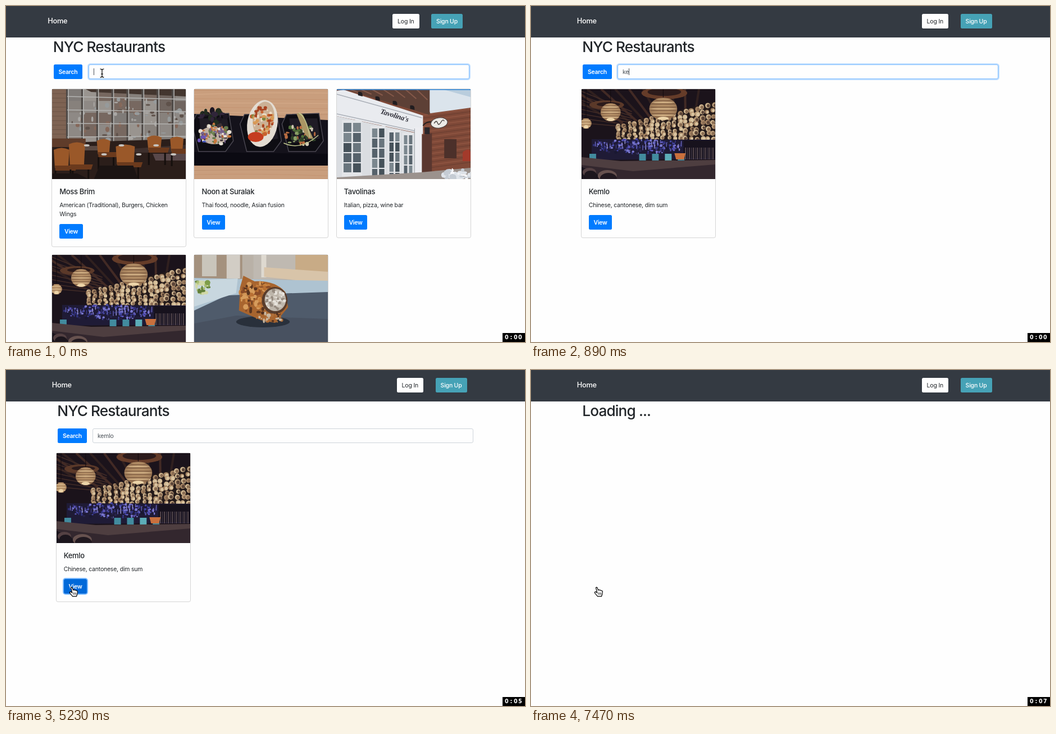
Write an HTML page that moves like this. It is 924 px wide and 598 px high and loops after 8 s.

```html
<!DOCTYPE html>
<html lang="en">
<head>
<meta charset="utf-8">
<title>Restaurant search</title>
<style>
  html, body { margin: 0; width: 100%; height: 100%; overflow: hidden; background: #fefefe; }
  svg { display: block; }
  text { font: 400 10.5px Inter, sans-serif; letter-spacing: -.02em; fill: #212529; }
  .label { font-weight: 500; fill: #fff; }
  .strong { font-weight: 600; letter-spacing: -.03em; }
  .home { font-size: 12.8px; font-weight: 500; fill: #fff; }
  .heading { font-size: 26.2px; font-weight: 500; letter-spacing: -.033em; }
  .title { font-size: 13px; font-weight: 500; letter-spacing: -.025em; }
  .typed { fill: #495057; }
  .clock { font: 700 9.6px "DejaVu Sans", sans-serif; letter-spacing: 0; fill: #fff; }
  .sign { font: italic 700 13px "Liberation Serif", serif; fill: #2b2b35; }
</style>
</head>
<body>
<svg id="stage" width="924" height="598" viewBox="0 0 924 598">
  <defs id="pictures"></defs>
  <g id="scene"></g>
</svg>
<script>
const LOOP = 8000;
const SCROLLBAR_SHIFT = -7.5;

const rect = (x, y, w, h, fill, extra = '') =>
  `<rect x="${x}" y="${y}" width="${w}" height="${h}" fill="${fill}" ${extra}/>`;
const oval = (x, y, rx, ry, fill, extra = '') =>
  `<ellipse cx="${x}" cy="${y}" rx="${rx}" ry="${ry}" fill="${fill}" ${extra}/>`;
const path = (d, fill, extra = '') => `<path d="${d}" fill="${fill}" ${extra}/>`;
const line = (d, color, width = 1) => path(d, 'none', `stroke="${color}" stroke-width="${width}"`);
const text = (x, y, value, cls = '', extra = '') =>
  `<text x="${x}" y="${y}" class="${cls}" ${extra}>${value}</text>`;
const times = (n, draw) => Array.from({ length: n }, (_, i) => draw(i)).join('');

let seed = 7;
const rnd = (a = 0, b = 1) => {
  seed = (seed * 16807) % 2147483647;
  return a + (b - a) * seed / 2147483647;
};
const pick = list => list[Math.floor(rnd(0, list.length))];
const specks = (n, x, y, rx, ry, colors, size = 4) => times(n, () => {
  const a = rnd(0, 6.3), r = Math.sqrt(rnd());
  return oval(x + rx * r * Math.cos(a), y + ry * r * Math.sin(a), rnd(1, size), rnd(1, size), pick(colors));
});

// Each picture is drawn in a 239 x 160 box.
function diner() {
  const chair = (x, y, w, h) =>
    path(`M${x} ${y + 4}q${w / 2} -7 ${w} 0l-2 ${h}h${4 - w}z`, '#9a5829') +
    path(`M${x + 2} ${y + h}h${w + 12}l-3 9h${-w - 8}z`, '#6b3a1d') +
    line(`M${x + 3} ${y + h + 9}v22M${x + w + 6} ${y + h + 9}v22`, '#150f0d', 3);
  return rect(0, 0, 239, 160, '#7f7772') +
    times(8, i => times(5, j => rect(24 + i * 28, j * 21, 28, 21,
      pick(['#7f7b78', '#8e8985', '#70655f', '#99948f', '#776860', '#87817c'])))) +
    specks(70, 140, 55, 105, 38, ['#a9a7a4', '#5f524b', '#85685a', '#969a9b'], 5) +
    path('M60 0H239V13L70 5z', '#43362f') +
    rect(0, 0, 27, 98, '#7e6353') +
    times(13, i => line(`M0 ${i * 8}h27`, '#6c5446')) +
    times(9, i => line(`M${27 + i * 27} 0V98`, '#4f4a47', 4) + line(`M${29 + i * 27} 0V98`, '#b9bab8', 1.5)) +
    times(4, j => line(`M27 ${13 + j * 24}L239 ${18 + j * 22}`, '#b4b4b2', 1.5)) +
    path('M0 96L239 88V160H0z', '#2b1e1a') +
    path('M0 88H60V103H0z', '#5f3c2a') +
    path('M130 107l109 -8v14H150z', '#3d2f2c') +
    path('M180 115h59v12h-54z', '#59484a') +
    path('M32 101h52v8H32z', '#5b4a43') +
    chair(3, 104, 28, 32) + chair(30, 94, 29, 40) + chair(80, 88, 24, 24) +
    chair(114, 98, 34, 32) + chair(170, 82, 26, 22) + chair(211, 84, 24, 22) +
    times(6, i => oval(62 + i * 31, 100 + (i % 2) * 16, 5, 2, '#c6c3bf')) +
    path('M0 150h45l20 10H0zM85 136h60l9 24H75z', '#1b1413');
}

function bowls() {
  const rim = x => `M${x + 8} 45L${x + 66} 43L${x + 74} 92L${x + 60} 111H${x + 12}L${x} 62z`;
  const bowl = x => path(rim(x), '#0e0d13') + line(rim(x), '#494650', 1.5) +
    path(`M${x + 13} 52h50l5 36l-50 8z`, '#1f1c25');
  return rect(0, 0, 239, 160, '#c99e7d') +
    times(22, i => line(`M0 ${i * 7.5 + 2}q120 ${rnd(-5, 5)} 239 ${rnd(-3, 3)}`, pick(['#bd9070', '#d5ac8b', '#c49472']))) +
    path('M0 44L239 55V136H0z', '#14121b') +
    path('M0 112l239 3v21H0z', '#0b0a12') +
    bowl(-4) + bowl(82) + bowl(157) +
    specks(30, 34, 50, 24, 12, ['#1c1622', '#302539', '#222d20'], 7) +
    oval(36, 82, 26, 16, '#bfb0a2') +
    specks(75, 37, 80, 29, 19, ['#e6ded2', '#a65a3c', '#c9773c', '#667c4c', '#75608a', '#3b3034'], 4) +
    specks(5, 15, 89, 7, 5, ['#4557c4', '#6b54b8']) +
    oval(122, 61, 27, 42, '#e3dcd2', 'transform="rotate(10 122 61)"') +
    oval(124, 53, 19, 31, '#cbb196', 'transform="rotate(10 124 53)"') +
    specks(70, 122, 56, 20, 27, ['#c8622f', '#d89a57', '#ecdcc5', '#7a843f', '#a84321'], 4) +
    oval(110, 85, 14, 9, '#c53d1f') +
    specks(65, 190, 82, 28, 19, ['#4f6e38', '#8ba067', '#d2c8b4', '#b96c41', '#2f4228'], 4) +
    path('M183 44q12 -6 16 14l14 30q-9 2 -16 -10z', '#a99564') +
    line('M187 42q14 8 20 44M160 96q30 14 62 -14', '#c1c78f', 1.5);
}

function storefront() {
  const door = (x, y, w) => rect(x, y, w, 160 - y, '#e3e5e8') +
    times(2, i => times(5, j => rect(x + 3 + i * (w / 2 - 1), y + 5 + j * 18, w / 2 - 4, 16,
      pick(['#56626b', '#69757d', '#46525a', '#7b878e']))));
  return rect(0, 0, 239, 160, '#7f4938') +
    path('M150 0H239V33L167 43z', '#dbe4ec') +
    path('M188 0H239V14z', '#b9cddd') +
    times(20, j => line(`M150 ${47 + j * 5}L239 ${35 + j * 5}`, j % 2 ? '#6e4032' : '#915642', 1.5)) +
    path('M0 0H166V46L20 2z', '#5d4036') +
    times(7, i => line(`M${22 + i * 20} 0l20 ${7 + i * 2}`, '#85594a', 2)) +
    path('M152 82L170 78V160H150z', '#5a372f') +
    path('M0 3L12 1L154 47V80L0 48z', '#e9ebef') +
    line('M0 44L152 77M0 9L152 51', '#a9aeb6', 1.5) +
    path('M0 48L150 80V160H0z', '#dadde1') +
    door(9, 55, 36) + door(60, 65, 27) + door(91, 72, 23) + door(117, 77, 20) +
    rect(139, 68, 13, 92, '#ecedf1') + line('M139 70V158', '#9fa5ab') +
    text(77, 43, 'Tavolina\'s', 'sign', 'transform="rotate(17 77 43)"') +
    times(4, i => path(`M${38 + i * 31} ${5 + i * 8}q9 -2 8 8l-8 -2z`, '#211d20')) +
    line('M154 65q8 -10 20 -5', '#24201f', 2) +
    rect(157, 68, 9, 12, '#29262a') +
    oval(183, 60, 15, 9, '#eceae6', 'stroke="#494342" transform="rotate(-8 183 60)"') +
    line('M174 61q4 -7 6 -1t6 -1t6 -2', '#3d3836', 1.3) +
    path('M192 89h22v34h-22z', '#4c302a') +
    path('M225 112q12 -9 14 0v16h-14z', '#a33a2b') +
    path('M0 157L150 148L239 140V160H0z', '#9b928d') +
    specks(40, 216, 151, 27, 8, ['#f6f7fa', '#dfe4ea', '#c5ccd4'], 6) +
    rect(0, 0, 239, 1.5, '#2f86d8');
}

function bar() {
  const lantern = (x, y, rx, ry) => oval(x, y, rx, ry, '#8f6c4d') +
    times(7, i => {
      const k = (i - 3) / 3.5;
      return oval(x, y + k * ry, rx * Math.sqrt(1 - k * k), 1.5, i % 2 ? '#cfae83' : '#b48f67');
    }) +
    line(`M${x} 0V${y - ry}`, '#140d10') +
    oval(x, y + ry - 3, rx * .4, 3, '#ecd4a8');
  return rect(0, 0, 239, 160, '#1b131b') +
    times(11, i => line(`M${i * 25 - 40} 0L${60 + i * 14} 60`, i % 2 ? '#422a25' : '#30201f', 4)) +
    times(8, i => line(`M0 ${i * 8 + 4}L90 ${40 + i * 4}`, '#432c27', 1.5)) +
    path('M62 65L239 22V90H62z', '#241a1a') +
    times(18, i => times(7, j => {
      const x = 66 + i * 10, top = 66 - i * 2.2, r = rnd(2.6, 4.2) + i * .07;
      const cx = x + rnd(-2, 2), cy = top + j * (88 - top) / 6 + rnd(-2, 2);
      return oval(cx, cy, r, r, pick(['#b99b78', '#cdb48f', '#a58463'])) +
        oval(cx + 1, cy + .5, r * .6, r * .65, pick(['#8b6d53', '#5c4538', '#d9c4a0']));
    })) +
    oval(45, 28, 31, 8, '#5b3929') + oval(48, 27, 21, 4, '#2a1a1b') +
    oval(148, 7, 41, 11, '#653c29') + oval(148, 5, 30, 7, '#2c1b1b') +
    lantern(146, 35, 25, 20) + lantern(52, 41, 18, 16) + lantern(8, 61, 10, 9) +
    path('M18 89L239 90V124L18 126z', '#1f1b36') +
    specks(230, 102, 102, 82, 13, ['#4547a6', '#5f58bd', '#31327c', '#7a78cf', '#27234c', '#191832'], 2.6) +
    times(30, i => rect(24 + i * 5.3, rnd(90, 101), 1.3, rnd(5, 11), pick(['#6c69c4', '#3b3a90', '#a29dd6']))) +
    rect(182, 91, 57, 32, '#17121d') +
    times(5, i => rect(i ? 80 + i * 23 : 14, 115, 12, 12, pick(['#5cadb8', '#428b9e', '#7dbfc5']))) +
    times(15, i => line(`M${186 + i * 3.5} 104v21`, i % 2 ? '#3d3442' : '#65565a', 1.5)) +
    path('M0 121L70 128L239 126V136L92 148L0 137z', '#4e3e40') +
    path('M0 135L92 146L239 134V160H0z', '#33272e') +
    path('M0 138L45 160H0z', '#19141c') +
    path('M166 114h20l-3 11h-14z', '#c9703d') +
    oval(46, 154, 17, 10, '#67524f') + oval(48, 159, 15, 10, '#211920') +
    oval(14, 148, 12, 8, '#544143') + oval(16, 153, 11, 8, '#1c161d');
}

function roll() {
  return rect(0, 0, 239, 160, '#b9b1a7') +
    rect(0, 0, 86, 45, '#a4917e') + rect(14, 0, 26, 38, '#c9c5bb') + rect(58, 0, 24, 42, '#d2cdc5') +
    rect(106, 0, 75, 43, '#bfb9b1') + rect(120, 0, 9, 40, '#ded9d0') + rect(181, 0, 58, 38, '#c8ab86') +
    path('M125 22L239 30V51L125 39z', '#d8c4a9') +
    path('M0 41L239 46V160H0z', '#aec3d1') +
    path('M0 99L58 72L239 66V160H0z', '#4f5b6b') +
    path('M0 122L75 108L239 114V160H0z', '#485160') +
    path('M0 45L78 42L75 68L0 92z', '#c8d7df') +
    specks(34, 14, 57, 15, 12, ['#7e9d49', '#a8bd70', '#d1d8a7', '#617f3a'], 5) +
    oval(123, 119, 48, 10, '#29303b') +
    path('M82 58L88 37L108 47Q144 45 163 66L168 93L145 121L119 116L80 99z', '#a8652f') +
    specks(110, 112, 75, 32, 28, ['#c98340', '#8a4c28', '#d69c5c', '#5c361f', '#b87034'], 5) +
    oval(144, 81, 23, 24, '#593d2c') + oval(145, 80, 19, 20, '#bdb5aa') +
    specks(60, 145, 80, 17, 18, ['#e6e2db', '#cfc8be', '#958a7f'], 3.5) +
    specks(35, 135, 111, 26, 10, ['#52301f', '#b06e38', '#c9b7a0'], 4);
}

const pictures = { diner, bowls, storefront, bar, roll };
document.getElementById('pictures').innerHTML = Object.entries(pictures).map(([id, draw]) =>
  `<symbol id="${id}" viewBox="0 0 239 160" preserveAspectRatio="none">${draw()}</symbol>`).join('');

const restaurants = [
  { name: 'Moss Brim', picture: 'diner', about: ['American (Traditional), Burgers, Chicken', 'Wings'] },
  { name: 'Noon at Suralak', picture: 'bowls', about: ['Thai food, noodle, Asian fusion'] },
  { name: 'Tavolinas', picture: 'storefront', about: ['Italian, pizza, wine bar'] },
  { name: 'Kemlo', picture: 'bar', about: ['Chinese, cantonese, dim sum'] },
  { name: '', picture: 'roll', about: [''] }
];

// Timelines: [start, value...]; the latest entry that has started is in force.
const typing = [[0, ''], [750, 'k'], [890, 'ke'], [990, 'kem'], [1290, 'kemlo']];
const caretOn = [[0, 1], [450, 0], [750, 1], [1890, 0], [2440, 1], [2890, 0]];
const clock = [[0, 0], [990, 1], [2040, 2], [3190, 3], [4180, 4], [5230, 5], [6270, 6], [7170, 7]];
const pointer = [[0, 'beam', 171, 119], [890, ''], [1890, 'arrow', 119, 225], [2040, 'arrow', 108, 262],
  [2140, 'arrow', 93, 305], [2290, 'arrow', 102, 344], [2440, 'arrow', 105, 368],
  [2590, 'hand', 117, 385.5], [2740, 'hand', 117, 386.5]];
const viewStyle = [[0, '#007bff', 0], [2590, '#0072ec', 0], [2740, '#0069d9', 0],
  [3040, '#0062cc', .3], [3190, '#0066d2', .45], [3290, '#0069d9', .5]];
const inputStyle = [[0, '#80bdff', .25], [3040, '#b5c9dc', 0], [3190, '#ced4da', 0]];
const at = (list, t) => list.filter(entry => entry[0] <= t).pop().slice(1);

const beam = 'M-3.5 -7q3 0 3.5 2q.5 -2 3.5 -2M0 -5V6M-3.5 8q3 0 3.5 -2q.5 2 3.5 2M-2 2h4';
const cursors = {
  beam: line(beam, '#fff', 2.6) + line(beam, '#000', 1.2),
  arrow: path('M0 0V14.5L3.3 11.4L5.7 17L8.4 15.9L6 10.4H10.5z', '#000', 'stroke="#fff" stroke-width="1.2"'),
  hand: path('M-1.5 .8Q-.3 -.7 1 .8L2.6 5.2Q4.6 3.8 5.4 5.6Q7.2 4.6 8 6.4Q10.2 5.8 10.4 8L9.8 12.5L8.5 16.3H1.6L-3.5 10.3Q-4 8.2 -2 8.2L.7 9.8z',
    '#fff', 'stroke="#000" stroke-width="1.2"') + line('M3 9.5v4M5.2 9.5v4M7.4 9.5v4', '#000', .8)
};

// Both edges snap to whole pixels, as a browser lays out boxes.
function button(x, y, w, label, fill, cls = 'label', ring = 0) {
  const left = Math.round(x), width = Math.round(x + w) - left;
  return (ring ? rect(left - 1, y - 1, width + 2, 28, 'none', `rx="4" stroke="#007bff" stroke-opacity="${ring}" stroke-width="2"`) : '') +
    rect(left, y, width, 26, fill, 'rx="2.5"') +
    text(x + 8.7, y + 17, label, cls);
}

function navbar(dx) {
  return rect(0, 0, 924, 56, '#343a42') + text(81.7 + dx, 31, 'Home', 'home') +
    button(695.9 + dx, 14, 47.3, 'Log In', '#fefefe', '') +
    button(764.9 + dx, 14, 55.9, 'Sign Up', '#46a2b6');
}

function card(item, index, dx, t) {
  const x = 88.7 + 253.2 * (index % 3) + dx, left = Math.round(x);
  const y = index < 3 ? 148 : 443;
  const extra = 16 * (item.about.length - 1);
  const [fill, ring] = at(viewStyle, t);
  return `<use href="#${item.picture}" x="${left + 1}" y="${y}" width="238" height="160"/>` +
    rect(left + .5, y - .5, 239, 265 + extra, 'none', 'rx="3" stroke="#000" stroke-opacity=".16"') +
    text(x + 14, y + 187, item.name, 'title') +
    item.about.map((row, i) => text(x + 14, y + 210 + 16 * i, row)).join('') +
    button(x + 14.2, y + 224 + extra, 41.5, 'View', fill, 'label strong', ring);
}

function searchPage(t) {
  const dx = t < 750 ? SCROLLBAR_SHIFT : 0;
  const [query] = at(typing, t), [border, ring] = at(inputStyle, t);
  const left = Math.round(154 + dx);
  const found = restaurants.filter(r => r.name.toLowerCase().includes(query));
  return navbar(dx) + text(91.3 + dx, 82, 'NYC Restaurants', 'heading') +
    button(92.4 + dx, 104, 51.4, 'Search', '#007bff', 'label strong') +
    (ring ? rect(left - .5, 103.5, 679, 27, 'none', `rx="4" stroke="#007bff" stroke-opacity="${ring}" stroke-width="3"`) : '') +
    rect(left + .5, 104.5, 677, 25, '#fefefe', `rx="2.5" stroke="${border}"`) +
    text(163 + dx, 121, query, 'typed', 'id="query"') +
    (at(caretOn, t)[0] ? rect(0, 111, 1, 12, '#495057', 'id="caret"') : '') +
    found.map((r, i) => card(r, i, dx, t)).join('');
}

function scene(t) {
  const page = t < 5670 ? searchPage(t)
    : t < 7470 ? '' : navbar(0) + text(91.3, 82, 'Loading ...', 'heading');
  const click = t >= 3040 && t < 3190
    ? oval(120, 385, 9.5, 9.5, 'none', 'stroke="#111" stroke-width="3"') +
      oval(120, 385, 9.5, 9.5, 'none', 'stroke="#fff" stroke-width="1.5"') : '';
  const [shape, x, y] = at(pointer, t);
  return rect(0, 0, 924, 598, '#fefefe') + page + click +
    (shape ? `<g transform="translate(${x} ${y})">${cursors[shape]}</g>` : '') +
    rect(884, 582, 40, 16, '#000') +
    text('888 897.5 904 912', 593, `0:0${at(clock, t)[0]}`, 'clock');
}

const sceneGroup = document.getElementById('scene');
let shown = '';

function placeCaret() {
  const caret = document.getElementById('caret'), query = document.getElementById('query');
  if (!caret) return;
  caret.setAttribute('x', Math.round(+query.getAttribute('x') + query.getComputedTextLength()));
}

function frame() {
  const markup = scene(performance.now() % LOOP);
  if (markup !== shown) {
    sceneGroup.innerHTML = shown = markup;
    placeCaret();
  }
  requestAnimationFrame(frame);
}
frame();
</script>
</body>
</html>
```
